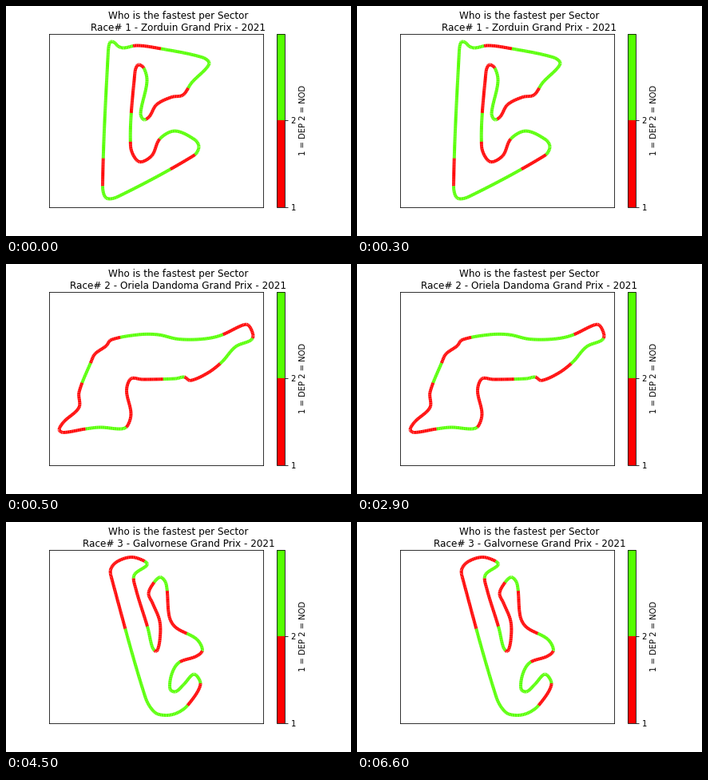
These frames come from a looping animation (432 by 288 pixels, 8 s). A matplotlib script:

```python
import numpy as np
import matplotlib.pyplot as plt
from matplotlib.animation import FuncAnimation
from matplotlib.collections import LineCollection

W, H = 432, 288
STEP = 500  # ms per animation step

# Each race: name, steps on screen, winner of each equally long sector,
# and key points of the track in stage pixels
RACES = [
    ("Zorduin", 1, "rgggggrgggrrggrrgrrggrggg",
     [(120.5, 225), (127.5, 56), (130, 44.5), (135, 45), (140, 50), (147, 52),
      (163, 49), (188, 52), (246, 64), (254, 72), (232, 95.5), (221, 111),
      (207, 113.5), (188, 123), (179, 138), (172, 142), (168, 134), (176, 94),
      (172, 77), (165, 73), (161, 82), (155.5, 175), (166, 194.5), (182, 187),
      (192, 166), (211, 156), (236, 167), (241, 176), (235, 186.5),
      (139, 238.5), (125, 240)]),
    ("Oriela Dandoma", 8, "ggrrrrgrrggrrgggggrrgrrrr",
     [(99, 206), (118, 204), (143, 206), (151, 203), (156, 187), (150.5, 158),
      (156, 143), (170, 144), (212, 143), (223, 141), (230, 145.5),
      (252, 136), (270, 122), (287, 103), (306, 95), (309, 89), (303, 76),
      (296, 76), (268, 89), (245, 93.5), (215, 93.5), (190, 88), (165, 88),
      (131, 94.5), (125, 102), (111, 112), (106, 122), (91, 160), (91, 179),
      (72, 197), (66, 207), (71, 210.5)]),
    ("Galvornese", 7, "gggggrrrrgrrgrrrgrrgrgggr",
     [(227, 229), (214, 238.5), (200, 241.5), (186, 238), (174, 219),
      (131.5, 69), (130.5, 59), (138, 49.5), (156, 43.5), (172, 48),
      (176.5, 53), (160, 66), (162, 83), (177, 132), (183, 157), (188, 161.5),
      (192, 148), (192, 124), (183, 101), (178, 89), (185, 75), (193, 68.5),
      (200, 77), (204, 118), (212, 131.5), (238, 146), (245.5, 160),
      (238, 167.5), (216, 175.5), (207, 190), (205, 209), (212, 212),
      (222, 203), (235, 190), (243, 203)]),
]


def spline(points):
    """Segments of a smooth closed curve through the points."""
    p = np.array(points)
    prev, nxt = np.roll(p, 1, axis=0), np.roll(p, -1, axis=0)
    h = np.hypot(*(nxt - p).T)[:, None]
    tan = (nxt - prev) / (h + np.roll(h, 1, axis=0))
    tan_nxt = np.roll(tan, -1, axis=0)
    line = []
    for a, b, ta, tb, d in zip(p, nxt, tan, tan_nxt, h):
        n = int(3 + d[0] / 2)
        t = np.arange(n)[:, None] / n
        ease = t * t * (3 - 2 * t)
        line.append(a + (b - a) * ease
                    + d * t * (1 - t) * (ta * (1 - t) - tb * t))
    line = np.vstack(line)
    return np.stack([line, np.roll(line, -1, axis=0)], axis=1)


def sector_values(segments, winners):
    """1 or 2 for each segment, from the sector its middle lies in."""
    size = np.hypot(*(segments[:, 1] - segments[:, 0]).T)
    middle = np.cumsum(size) - size / 2
    sector = (middle / size.sum() * len(winners)).astype(int)
    return np.array([1 if w == "r" else 2 for w in winners])[sector]


scenes = []
for k, (name, steps, winners, points) in enumerate(RACES, 1):
    segments = spline(points)
    text = ("Who is the fastest per Sector\n"
            f"Race# {k} - {name} Grand Prix - 2021")
    scenes += [(text, segments, sector_values(segments, winners))] * steps

plt.rcParams["font.family"] = "DejaVu Sans"
plt.rcParams["font.size"] = 10
fig, ax = plt.subplots(figsize=(W / 72, H / 72), dpi=72)
fig.subplots_adjust(left=0.125, right=0.9, bottom=0.125, top=0.88)

cmap = plt.get_cmap("prism", 2)
track = LineCollection([], cmap=cmap, norm=plt.Normalize(1, 3), linewidth=4)
ax.add_collection(track)
bar = fig.colorbar(track, ax=ax, boundaries=[1, 2, 3], ticks=[1, 2])
bar.set_label("1 = DEP 2 = NOD")

# Data units are stage pixels, y down, whole numbers at pixel centres
box = ax.get_position()
ax.set_xlim(box.x0 * W - 0.5, box.x1 * W - 0.5)
ax.set_ylim((1 - box.y0) * H - 0.5, (1 - box.y1) * H - 0.5)
ax.set_xticks([])
ax.set_yticks([])
title = fig.suptitle("", fontsize=12)


def update(i):
    text, segments, values = scenes[i]
    title.set_text(text)
    track.set_segments(segments)
    track.set_array(values)
    return track, title


anim = FuncAnimation(fig, update, frames=len(scenes), interval=STEP,
                     init_func=lambda: update(0), repeat=True, repeat_delay=0,
                     blit=False)
plt.show()
```
